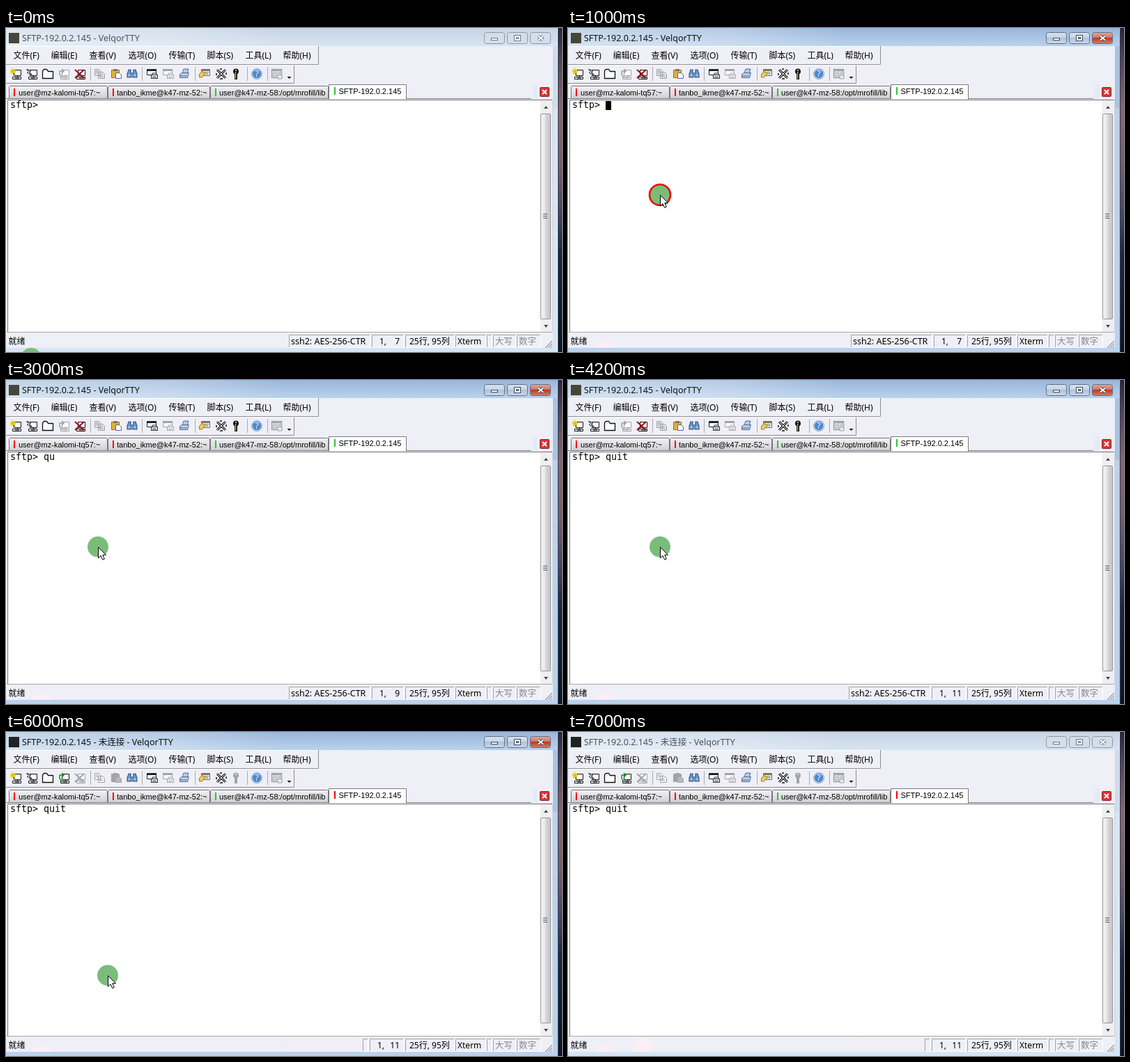
These frames come from a looping animation (798 px wide and 466 px high, 7.2 s). An HTML page:

```html
<!DOCTYPE html>
<html lang="zh-CN">
<head>
<meta charset="utf-8">
<title>SFTP session</title>
<style>
  html, body { margin: 0; width: 100%; height: 100%; overflow: hidden; }
  svg { display: block; width: 798px; height: 466px; }
  text { white-space: pre; font: 12px 'Noto Sans', 'Noto Sans CJK SC', 'Noto Sans CJK', sans-serif; }
  .wide { font-size: 12.5px; }
  .tab { font: 11px 'Liberation Sans', Arial, sans-serif; }
  .term { font: 13.3px 'DejaVu Sans Mono', monospace; }
</style>
</head>
<body>
<svg id="stage" viewBox="0 0 798 466"></svg>
<script>
const LOOP = 7200, STEP = 200;
const FACE = '#efeff7', EDGE = '#8c8c94', GREY = '#a3a3a8', INK = '#111';
const stage = document.getElementById('stage');

const rect = (x, y, w, h, fill, more = '') =>
  `<rect x="${x}" y="${y}" width="${w}" height="${h}" fill="${fill}" ${more}/>`;
const path = (d, stroke = INK, fill = 'none', width = 1) =>
  `<path d="${d}" stroke="${stroke}" fill="${fill}" stroke-width="${width}"/>`;
const disc = (x, y, r, fill, more = '') =>
  `<circle cx="${x}" cy="${y}" r="${r}" fill="${fill}" ${more}/>`;
const text = (x, y, s, cls = '', fill = '#000', anchor = 'start') =>
  `<text x="${x}" y="${y}" class="${cls}" fill="${fill}" text-anchor="${anchor}">${s.replace(/>/g, '&gt;')}</text>`;
const gradient = (id, stops, across = false) =>
  `<linearGradient id="${id}" x2="${+across}" y2="${+!across}">` +
  stops.map(([at, color]) => `<stop offset="${at}" stop-color="${color}"/>`).join('') + '</linearGradient>';

// Last value whose start time has been reached.
const latest = (t, list) => list.filter(([start]) => start <= t).pop()[1];

const defs = '<defs>' +
  gradient('active', [[0, '#98b6da'], [1, '#bad2ec']]) +
  gradient('idle', [[0, '#c6d4e4'], [1, '#d7e4f2']]) +
  gradient('glow', [[0, '#fff6'], [.3, '#fff4'], [.5, '#fff0']], true) +
  gradient('button', [[0, '#d8e3f0'], [.48, '#c4d3e6'], [.5, '#afc3db'], [1, '#c9d9ec']]) +
  gradient('close', [[0, '#e3a99c'], [.48, '#cf7263'], [.5, '#b83a26'], [1, '#d5805f']]) +
  gradient('tab', [[0, '#f2f2f4'], [.45, '#e2e2e6'], [1, '#cfcfd4']]) +
  gradient('thumb', [[0, '#f5f5f5'], [.45, '#e6e6ea'], [.55, '#d4d4d8'], [1, '#c4c4ca']], true) +
  gradient('wall', [[0, '#28253c'], [.1, '#54445c'], [.25, '#8a636f'], [.42, '#7a5b6c'],
    [.58, '#454563'], [.7, '#1c2444'], [1, '#0b1426']]) + '</defs>';

function titleBar(active, online) {
  const ink = active ? '#3c4656' : '#6d7682', line = active ? '#5f7089' : '#8998aa';
  const box = (x, fill) => rect(x + .5, 6.5, 29, 16, fill, `rx="3" stroke="${line}"`);
  const plain = active ? 'url(#button)' : '#d3deeb';
  const cross = 'M764 11.5l7 6M771 11.5l-7 6';
  return rect(0, 0, 792, 466, active ? '#bad2ec' : '#d6e5f4') +
    rect(785, 0, 7, 115, active ? '#a9c3e1' : '#cddbea') +
    rect(0, 0, 792, 26, `url(#${active ? 'active' : 'idle'})`) +
    rect(0, 0, 792, 26, 'url(#glow)') +
    rect(4, 7, 15, 15, online ? '#47463a' : '#232323') +
    text(23, 19, `SFTP-192.0.2.145${online ? '' : ' - 未连接'} - VelqorTTY`, 'wide', active ? '#111' : '#4b525c') +
    box(686, plain) + box(719, plain) + box(752, active ? 'url(#close)' : plain) +
    rect(696.5, 14.5, 9, 3, '#fff', `stroke="${ink}"`) +
    rect(729.5, 10.5, 9, 8, '#fff', `stroke="${ink}"`) + rect(732.5, 13.5, 3, 2, plain, `stroke="${ink}"`) +
    path(cross, ink, 'none', 4) + path(cross, '#fff', 'none', 2);
}

const menuItems = [[11, '文件(F)'], [65, '编辑(E)'], [120, '查看(V)'], [176, '选项(O)'],
  [234, '传输(T)'], [289, '脚本(S)'], [344, '工具(L)'], [398, '帮助(H)']];

const menu = () => rect(0, 26, 785, 434, FACE) +
  path('M0 52.5H448.5V26M0 79.5H413.5V53', EDGE) + path('M0 53.5H448M0 26.5H448', '#fff') +
  menuItems.map(([x, s]) => text(x - .6, 44, s)).join('');

const computer = (c = INK) => path('M5.5 2.5h10v8h-10zM3.5 12.5h12v3h-12zM10.5 10.5v2M7 14h6', c, '#fff');
const bolt = (c = INK) => path('M.5 1.5l6 2-2 2 4 4-7-3 2-2z', c, '#fff');
const printer = (c, fill) => path('M5 7l2-6h7l-2 6M1.5 8.5l3-2h10l-2 7h-11z', c, fill) + path('M2 11h10', c);
const screenPrint = c => path('M.5 1.5h13v8h-13z', c, '#fff') + rect(0, 1, 14, 3, c) +
  path('M6.5 9.5h9v5h-9zM8 9V7h6v2M8 12.5h6', c, '#f4f4f4');

function toolbar(online) {
  const on = (yes, color) => yes ? color : GREY;
  const live = on(online, INK), dead = on(!online, INK), cut = 'M1 2l13 12M14 2L1 14';
  const burst = path('M4 0v9M0 4.5h9M1 1.5l6 6M7 1.5l-6 6', '#d9c800', 'none', 1.4);
  const icons = [
    [6, computer() + burst],
    [29, computer() + bolt()],
    [52, path('M.5 14.5v-11l2-2h4l2 3h7v10z', INK, '#fff', 1.3)],
    [75, computer(dead) + path('M2 9V4h5M5 1l3 3-3 3M2 9l4 5', on(!online, '#129a32'), 'none', 1.6)],
    [98, computer(live) + path(cut, on(online, '#a00018'), 'none', 2)],
    [126, path('M1.5 1.5h6l2 2v7h-8zM6.5 5.5h6l3 3v6h-9z', GREY, online ? '#dedee2' : '#f4f4f5') +
      path('M3 4h4M3 6h3M8 9h4M8 11.5h5', GREY)],
    [150, path('M1.5 2.5h11v11h-11z', on(online, '#94722a'), on(online, '#e5ad42')) +
      rect(4, 1, 6, 3, on(online, '#777')) +
      path('M7.5 6.5h5l3 3v5h-8z', on(online, '#4c678e'), online ? '#f7faff' : '#b9b9bd')],
    [173, path('M3 2h3v3l1 3v5H1V8zM10 2h3l2 6v5H9V8l1-3zM7 7h2', '#315b91', '#6f9bc9', 1.2) +
      path('M2 10h4M10 10h4', '#dbeafa')],
    [202, screenPrint('#22222a')],
    [225, screenPrint(GREY)],
    [248, printer('#536c8d', '#b9cde4')],
    [277, path('M3.5 1.5h12v9h-12z', '#6e6a62', '#f1efe8') + rect(4, 2, 11, 2, '#8a7a55') +
      path('M8 6h6M8 8h5', '#777') + path('M.5 8l4-3 4 1-1 3-3 4h-4z', '#a0812a', '#edc960')],
    [301, path('M2 2l12 12M14 2L2 14', INK, 'none', 3) + path('M2 2l12 12M14 2L2 14', '#fff') +
      path('M6 1h3M1 7v3M15 6v3M6 15h4', INK, 'none', 1.5)],
    [322, disc(8, 4.5, 4, live) + disc(8, 3, 1, FACE) + path('M8 7v9', live, 'none', 4) +
      path('M7.5 5v10', on(online, '#cdbb22'), 'none', 1.3)],
    [352, disc(8, 8, 7, '#4e88cc', 'stroke="#dbe8f7" stroke-width="1.5"') +
      disc(8, 8, 7.5, 'none', 'stroke="#567fac" stroke-width=".7"') +
      text(8, 12.3, '?', '', '#fff', 'middle')],
    [381, path('M.5 1.5h14v12H.5z', GREY, '#d9d9df', 1.5) + rect(0, 1, 15, 3, GREY) +
      path('M3 7h4v4H3zM9 7h4M9 10h6v5H9z', GREY, '#eee')]
  ];
  return [121, 195, 271, 346, 375].map(x => rect(x, 56, 1, 20, '#aaaab0')).join('') +
    icons.map(([x, art]) => `<g transform="translate(${x} 58)">${art}</g>`).join('') +
    path('M403.5 70h6l-3 3z', 'none', INK);
}

function tabs(online) {
  const items = [[5, 141, 'user@mz-kalomi-tq57:~', 18, 'red'], [147, 146, 'tanbo_ikme@k47-mz-52:~', 159, 'red'],
    [294, 169, 'user@k47-mz-58:/opt/mrofill/lib', 306, '#2fc52f']];
  return path('M0 101.5H754', '#777780') +
    items.map(([x, w, label, tx, mark]) =>
      path(`M${x - .5} 101.5V84.5l1-1h${w - 2}l1 1V101.5z`, '#77777d', 'url(#tab)') +
      rect(x + 6, 87, 2, 11, mark) + text(tx, 97, label, 'tab')).join('') +
    path('M463.5 102.5V81.5H574.5V102.5', '#77777d', '#fff') +
    rect(471, 85, 2, 11, online ? '#2fc52f' : 'red') + text(477.5, 95, 'SFTP-192.0.2.145', 'tab') +
    rect(756, 81, 7, 21, '#e3ebf6') +
    rect(766.5, 85.5, 13, 13, '#d83636', 'rx="1" stroke="#8c2222"') +
    path('M770 89l6 6M776 89l-6 6', '#fff', 'none', 2);
}

function terminal(typed, cursorCol) {
  return rect(1, 103, 784, 335, '#fff') + path('M2.5 437V103.5H784', '#707078') + path('M1 437.5H785', '#a6a6ae') +
    text(6, 115, 'sftp> ' + typed, 'term') +
    (cursorCol ? rect(6 + 8 * cursorCol, 105, 8, 13, '#000') : '') +
    rect(767, 104, 17, 333, '#efeff2') + path('M784.5 103V438', '#d5d5dc') +
    rect(767.5, 123.5, 14, 295, 'url(#thumb)', 'rx="1.5" stroke="#96969c"') +
    path('M771 267.5h6M771 270.5h6M771 273.5h6', '#55555c') +
    path('M772 116h6l-3-4zM772 427h6l-3 4z', 'none', '#44444a');
}

function statusBar(column, online, ghosts) {
  const panel = (x, right) => path(`M${x + .5} 460V441.5H${right}`, '#a3a3aa') +
    path(`M${right + .5} 441V459.5H${x}`, '#fff');
  const left = column > 9 ? 522 : 525;
  return ghosts.map(([x, y]) => disc(x, y, 15, '#faeff4')).join('') +
    text(3.5, 455, '就绪') +
    (online ? panel(left - 119, left - 3) + text(left - 116, 455, 'ssh2: AES-256-CTR', 'wide')
      : rect(403.5, 440.5, 108, 19, '#f2eef5', 'stroke="#f7eaf0"') + panel(512, 519)) +
    panel(left, 570) + text(left + 11, 455, '1,') + text(565, 455, '' + column, '', '#000', 'end') +
    panel(573, 643) + text(579, 455, '25行, 95列') +
    panel(645, 688) + text(648, 455, 'Xterm') + panel(690, 697) +
    panel(699, 731) + text(702, 455, '大写', 'wide', '#888890') +
    panel(733, 767) + text(736, 455, '数字', 'wide', '#888890') +
    path('M774 460l10-10M778 460l6-6M782 460l2-2', '#a0a0aa', 'none', 1.5);
}

const desktopEdge = active =>
  rect(0, 460, 792, 6, active ? '#bad2ec' : '#d6e5f4') +
  rect(791, 0, 1, 466, active ? '#86d6f4' : '#e4eef8') +
  rect(792, 0, 1, 466, '#353b4a') + rect(793, 0, 5, 466, 'url(#wall)');

function pointer(pos, pressed) {
  if (!pos) return '';
  const [x, y] = pos;
  return disc(x, y, 15, '#7abd7b', pressed ? 'stroke="#f00000" stroke-width="2.6"' : '') +
    `<g transform="translate(${x + .5} ${y + .5})">` +
    path('M0 0V15.5L3.6 12.2 6.2 18 8.8 16.9 6.3 11.2H11z', '#000', '#fff') + '</g>';
}

function scene(t) {
  const active = t >= 1000 && t < 7000, online = t < 4400;
  const typed = latest(t, [[0, ''], [2600, 'q'], [3000, 'qu'], [3200, 'quit']]);
  const cursorCol = latest(t, [[0, 0], [1000, 6], [2000, 0], [2600, 7], [3000, 0], [3200, 10], [4200, 0]]);
  const column = latest(t, [[0, 7], [2800, 8], [3000, 9], [3200, 10], [3400, 11]]);
  const mouse = latest(t, [[0, [36, 475]], [200, [52, 464]], [400, [122, 308]], [600, [125, 279]],
    [800, [132, 240]], [6000, [146, 350]], [6200, [107, 454]], [6400, null]]);
  const ghosts = [[400, 52, 464], [6400, 107, 454]].filter(g => t >= g[0]).map(g => g.slice(1));
  return defs + titleBar(active, online) + menu() + toolbar(online) + tabs(online) +
    terminal(typed, cursorCol) + statusBar(column, t < 4600, ghosts) +
    desktopEdge(active) + pointer(mouse, t >= 1000 && t < 1200);
}

let shown = -1;
function tick() {
  const step = Math.floor(performance.now() % LOOP / STEP);
  if (step !== shown) stage.innerHTML = scene((shown = step) * STEP);
  requestAnimationFrame(tick);
}
tick();
</script>
</body>
</html>
```
